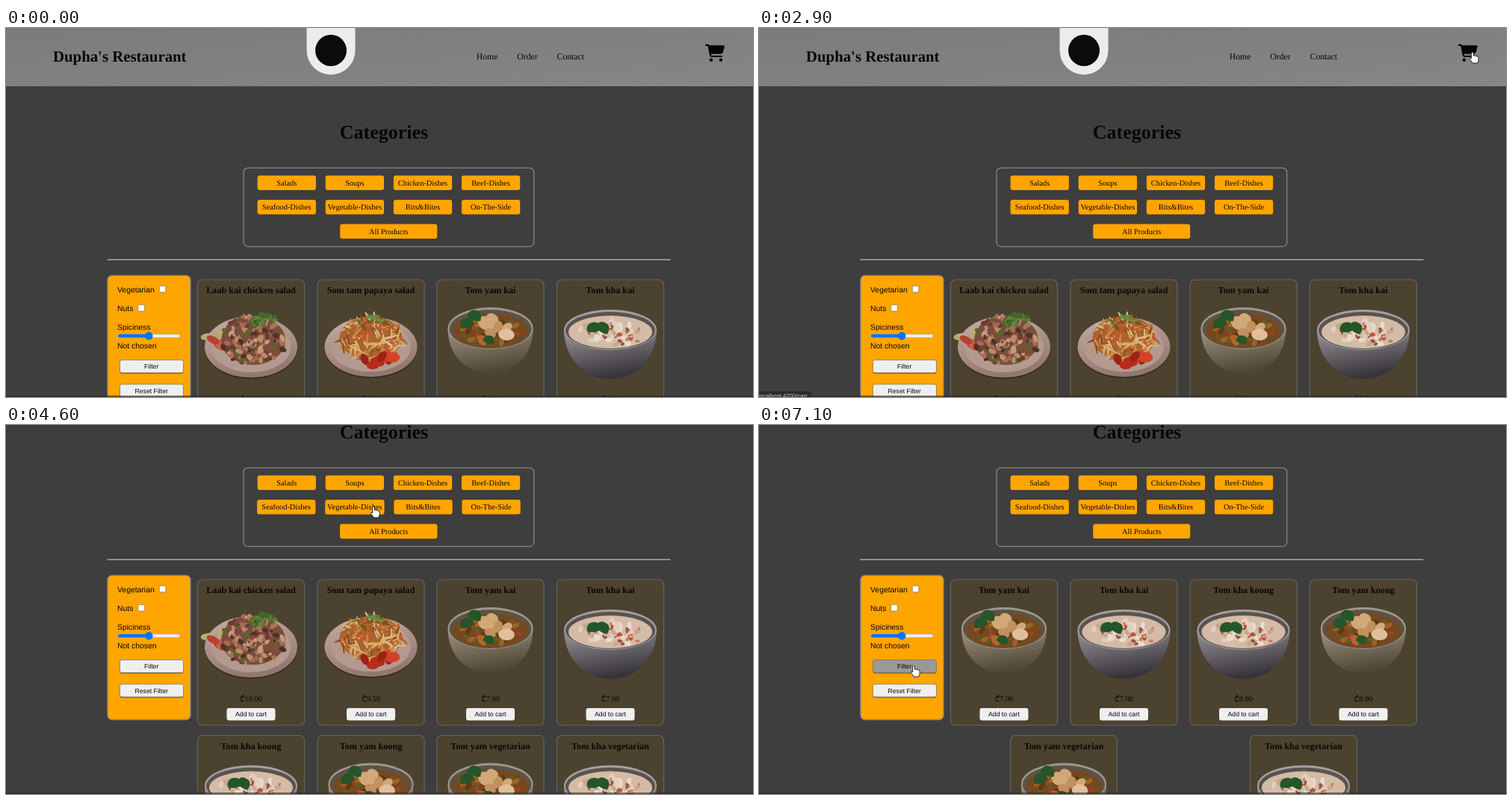
Recreate the animation shown at these times as an HTML page. Size 1000 px wide and 494 px high, loop 7.2 s.

```html
<!DOCTYPE html>
<html lang="en">
<head>
<meta charset="utf-8">
<title>Restaurant menu</title>
<style>
  html, body { margin: 0; width: 100%; height: 100%; overflow: hidden; background: #3e3e3e; }
  svg { display: block; width: 100vw; height: 100vh; }
  text { font-family: "Liberation Serif", "Times New Roman", "DejaVu Sans", serif; fill: #0b0505; text-rendering: geometricPrecision; }
  .sans { font-family: "Liberation Sans", Arial, sans-serif; }
  .bold { font-weight: bold; }
  .mid { text-anchor: middle; }
</style>
</head>
<body>
<svg id="stage" viewBox="0 0 1000 494"></svg>
<script>
const LOOP = 7200, STEP = 100;
const stage = document.getElementById('stage');
const $ = id => document.getElementById(id);

// ---------- drawing helpers ----------
const text = (s, x, y, size, cls = 'mid', extra = '') =>
  `<text class="${cls}" x="${x}" y="${y}" font-size="${size}" ${extra}>${s}</text>`;
const rect = (x, y, w, h, r, fill, extra = '') =>
  `<rect x="${x}" y="${y}" width="${w}" height="${h}" rx="${r}" fill="${fill}" ${extra}/>`;
const oval = (x, y, rx, ry, fill, extra = '') =>
  `<ellipse cx="${x}" cy="${y}" rx="${rx}" ry="${ry}" fill="${fill}" ${extra}/>`;
const path = (d, fill, extra = '') => `<path d="${d}" fill="${fill}" ${extra}/>`;

function random(seed) {
  return () => (seed = (seed * 16807) % 2147483647) / 2147483647;
}

// Scatter n small pieces inside an ellipse.
function bits(seed, n, cx, cy, rx, ry, size, flat, colors) {
  const rnd = random(seed * 7919);
  let out = '';
  for (let i = 0; i < n; i++) {
    const a = rnd() * 6.283, d = Math.sqrt(rnd()), s = size * (0.6 + rnd() * 0.7);
    const x = (cx + Math.cos(a) * d * rx).toFixed(1), y = (cy + Math.sin(a) * d * ry).toFixed(1);
    out += oval(x, y, s.toFixed(1), (s * flat).toFixed(1), colors[i % colors.length],
      `transform="rotate(${(rnd() * 180) | 0} ${x} ${y})"`);
  }
  return out;
}
// Pieces piled on a solid base.
const heap = (base, seed, n, cx, cy, rx, ry, ...rest) =>
  oval(cx, cy, rx, ry, base) + bits(seed, n, cx, cy, rx, ry, ...rest);

const plate = (y, rx, ry) =>
  oval(0, y + 2, rx, ry, '#3a2c26') + oval(0, y, rx, ry, 'url(#rim)') +
  oval(0, y, rx * 0.86, ry * 0.83, '#b39a90');
const dip = (x, y) =>
  oval(x, y + 7, 22, 13, '#15110f') + oval(x, y, 25, 13, '#24201d') +
  oval(x, y + 1, 20, 9, '#451c10') + bits(5, 9, x, y, 13, 5, 2.5, 0.6, ['#8c3c16', '#64732b', '#b0562a']);
const leaf = (x, y, r, s = 1) =>
  path('M-10 2Q-9-9 1-8Q9-8 9 4Q0 8-10 2Z', '#24562a', `transform="translate(${x} ${y}) rotate(${r}) scale(${s})"`);
const bowl = (top, rx, ry, foot, body, rim, soup) =>
  path(`M${-rx} ${top}C${-rx} ${top + 34} ${-rx * 0.62} ${foot} 0 ${foot}C${rx * 0.62} ${foot} ${rx} ${top + 34} ${rx} ${top}Z`, `url(#${body})`) +
  oval(0, top, rx, ry, rim) + oval(0, top + 1, rx - 2, ry - 2, '#5a534d') + oval(0, top + 3, rx - 6, ry - 5, soup);

const foods = {
  laab: plate(3, 62, 41) +
    bits(3, 9, -46, -11, 13, 14, 8, 0.5, ['#b8402f', '#b5ad77', '#c9614a']) +
    heap('#7c4d3b', 11, 170, 3, -6, 43, 33, 4.2, 0.65, ['#a56a50', '#bd8a6c', '#6a3d30', '#c79a7c', '#7d4a44', '#a9745a', '#57652f', '#4f3026']) +
    bits(8, 16, 18, -33, 16, 9, 4.5, 0.5, ['#41692a', '#5c8238']),
  somtam: plate(3, 62, 40) +
    heap('#a7662f', 21, 130, 0, -9, 42, 29, 10, 0.14, ['#c98a45', '#dcae6c', '#a85f2a', '#c25a2c', '#d9b98a', '#8a4a22']) +
    bits(6, 12, -2, -32, 18, 7, 6, 0.3, ['#48702f', '#6b8a42', '#b9622f']) +
    bits(13, 9, 15, 21, 26, 9, 9, 0.65, ['#b92b1b', '#d24229', '#9c2215']),
  yam: bowl(-22, 57, 28, 38, 'warm', '#a09886', '#75491f') +
    bits(9, 45, 1, -19, 41, 17, 5, 0.55, ['#9c6227', '#5d3a18', '#b1662f', '#5b6128', '#a33f20']) +
    bits(16, 7, 6, -23, 27, 13, 10, 0.72, ['#d2a878', '#c1915f', '#dfc09a']) +
    leaf(-21, -38, 15) + leaf(-31, -28, -25) + leaf(-2, -6, 10, 0.8),
  kha: bowl(-20, 62, 27, 46, 'cool', '#a39ea1', '#d3bba7') +
    bits(12, 30, 3, -16, 45, 16, 6, 0.6, ['#e2cfbe', '#c9a78f', '#e9dbcd']) +
    bits(17, 24, 7, -14, 42, 15, 2.8, 0.6, ['#bd5138', '#cb7657', '#945040']) +
    leaf(-22, -22, -15) + leaf(-10, -22, 30),
  crackers: oval(0, 16, 63, 35, '#1f1a1a') + oval(0, 13, 59, 31, '#3b3031') +
    path('M-50-4Q-35-48-12-46Q14-51 27-32Q62-18 58 10Q46 32 14 34Q-24 37-50 18Q-61 9-50-4Z', '#cda98e') +
    path('M-48-1Q-27-48 0-42Q10-23-8 1Q-29 20-48-1Z', '#e0c3ab') +
    path('M2-36Q38-37 42-8Q27 12 4 2Q-7-17 2-36Z', '#d9b89d') +
    path('M16 1Q44-15 58 4Q54 24 28 25Q9 19 16 1Z', '#e3c9b4') +
    path('M-43 11Q-14-8 12 14Q18 30-8 34Q-36 31-43 11Z', '#dbbba2'),
  cakes: plate(3, 60, 38) +
    bits(31, 14, 38, 8, 15, 18, 8, 0.2, ['#d9cca8', '#b5ac78']) +
    heap('#6b2d14', 4, 50, 3, 3, 38, 20, 9, 0.62, ['#86391a', '#a04e22', '#5e2410', '#b0602c']) + dip(-16, -35),
  satay: plate(1, 58, 40) +
    bits(22, 34, 8, -15, 38, 20, 9, 0.15, ['#dccba4', '#c9b282', '#7d8a4a']) +
    heap('#85491d', 7, 70, -1, 2, 36, 21, 7, 0.5, ['#a8652a', '#874819', '#bd7c3e', '#6d3814']),
  sauce: `<circle cx="-2" cy="-26" r="31" fill="#8a8178"/><circle cx="-2" cy="-26" r="28.5" fill="#393536"/>` +
    rect(-17, -42, 30, 30, 0, '#d8cabc') +
    path('M-36 20L-29 48Q0 59 29 48L36 20Z', '#a84a1b') + oval(0, 20, 37, 14, '#c4a596') +
    oval(0, 20, 32, 10.5, '#a0441a') + bits(18, 16, 0, 20, 24, 7, 3, 0.6, ['#c66f2a', '#bd5a24', '#7d2f12']) +
    path('M-36 24Q0 48 36 24L35 31Q0 54-35 31Z', '#c49a85', 'opacity=".75"'),
  shrimp: plate(5, 61, 40) +
    heap('#b3682f', 23, 45, -17, -4, 36, 24, 13, 0.33, ['#cc8445', '#daa36b', '#b5652a', '#e2ba8a']) + dip(36, -26),
  mini: plate(7, 60, 39) +
    heap('#8d4d1f', 25, 30, 4, 10, 37, 18, 13, 0.35, ['#b56f30', '#9b5520', '#ca8b45']) + dip(-9, -31),
  rolls: plate(5, 61, 40) +
    heap('#9d5c25', 27, 34, -9, 0, 39, 21, 14, 0.36, ['#c28039', '#d39b54', '#a66126']) + dip(21, -28)
};

// ---------- page parts ----------
function card(x, y, [name, food, price]) {
  const lines = name.split('|'), cx = x + 71.5, drop = (lines.length - 1) * 14;
  return rect(x, y, 143, 195, 6.5, '#4c4230', 'stroke="#6b635c" stroke-width="1.2"') +
    lines.map((s, i) => text(s, cx, y + 18 + i * 14, 12.19, 'bold mid')).join('') +
    `<use href="#${food}" x="${cx}" y="${y + 87 + drop}"/>` +
    text('₾' + price, cx, y + 163 + drop, 10.4) +
    rect(cx - 32.5, y + 172 + drop, 65, 16.5, 3, '#efefef') +
    text('Add to cart', cx, y + 183.3 + drop, 8.68, 'sans mid');
}

const TOP = [256.5, 417, 577, 737.5];
const menus = {
  all: { below: TOP, items: [
    ['Laab kai chicken salad', 'laab', '10.00'], ['Som tam papaya salad', 'somtam', '9.50'],
    ['Tom yam kai', 'yam', '7.00'], ['Tom kha kai', 'kha', '7.00'],
    ['Tom kha koong', 'kha', '8.00'], ['Tom yam koong', 'yam', '8.00'],
    ['Tom yam vegetarian', 'yam', '7.00'], ['Tom kha vegetarian', 'kha', '7.00']] },
  snacks: { below: [283.5, 497, 711], items: [
    ['Prawn crackers', 'crackers', '2.50'], ['Fish cakes', 'cakes', '6.50'],
    ['Chicken satay', 'satay', '6.50'], ['Satay sauce', 'sauce', '1.50'],
    ['Shrimp springrolls', 'shrimp', '6.50'], ['Mini vegetarian spring|rolls', 'mini', '5.50'],
    ['Chicken springrolls', 'rolls', '6.50']] },
  soups: { below: [336.5, 657.5], items: [
    ['Tom yam kai', 'yam', '7.00'], ['Tom kha kai', 'kha', '7.00'],
    ['Tom kha koong', 'kha', '8.00'], ['Tom yam koong', 'yam', '8.00'],
    ['Tom yam vegetarian', 'yam', '7.00'], ['Tom kha vegetarian', 'kha', '7.00']] }
};
const menu = ([id, m]) => `<g id="${id}">` + m.items.map((it, i) =>
  i < 4 ? card(TOP[i], 337, it) : card(m.below[i - 4], 545.5, it)).join('') + '</g>';

const nav = [['Home', 644], ['Order', 698], ['Contact', 755.8]]
  .map(([name, cx]) => ({ name, cx, box: [cx - 21, 27, 42, 22] }));
const cats = ['Salads', 'Soups', 'Chicken-Dishes', 'Beef-Dishes', 'Seafood-Dishes',
  'Vegetable-Dishes', 'Bits&amp;Bites', 'On-The-Side', 'All Products'].map((name, i) => {
  const last = i === 8, w = last ? 130 : 78.3;
  const x = last ? 447.2 : 336.6 + (i % 4) * 91.1, y = 197.5 + (i >> 2) * 32.5;
  return { name, row: i >> 2, cx: x + w / 2, cy: y + 9.8, box: [x, y, w, 19.6] };
});
const filterBox = [152.5, 444.5, 85, 17];

const check = (x, y) => rect(x, y, 8.5, 8.5, 1.6, '#fff', 'stroke="#767676" stroke-width=".7"');
const button = (label, y, id) =>
  rect(152.5, y + 1.3, 85, 17, 2.5, '#6b4a10', 'opacity=".75"') +
  rect(152.5, y, 85, 17, 2.5, '#efefef', `id="${id}" stroke="#77705f" stroke-width=".7"`) +
  text(label, 194.7, y + 11.6, 8.68, 'sans mid');
const wheel = x => oval(x, 42.7, 2.2, 2.2, '#050303');

const shade = (id, a, b, x = 0.3) => `<linearGradient id="${id}" x2="${x}" y2="1">` +
  `<stop stop-color="${a}"/><stop offset="1" stop-color="${b}"/></linearGradient>`;

stage.innerHTML = '<defs>' +
  shade('warm', '#a0957f', '#4f4738') + shade('cool', '#9b969c', '#37343a') +
  shade('rim', '#c8aea6', '#93786f') + shade('bar', '#7b7b7b', '#868686', 1) +
  Object.entries(foods).map(([id, art]) => `<g id="${id}">${art}</g>`).join('') + '</defs>' +
  rect(0, 0, 1000, 494, 0, '#3e3e3e') + '<g id="page">' +
  rect(0, 0, 1000, 78, 0, 'url(#bar)') +
  text("Dupha's Restaurant", 63, 45, 20.8, 'bold') +
  '<g id="badge">' + path('M402.5 0V30A32.5 32.5 0 0 0 467.5 30V0Z', '#ececef') +
  '<circle cx="435" cy="30" r="21" fill="#0b0b0b"/></g>' +
  nav.map((n, i) => `<g id="nav${i}">${text(n.name, 0, 4, 11.72)}</g>` +
    rect(n.cx - 7.5, 45.7, 15, 2, 1, '#ffc531', `id="line${i}"`)).join('') +
  path('M937 22.8H939.2Q940.4 22.8 940.6 24L942.9 36.1Q943.3 38 945.1 38H958', 'none',
    'stroke="#050303" stroke-width="2.2" stroke-linecap="round" stroke-linejoin="round"') +
  path('M941 23.2H960Q962.2 23.2 961.7 25.4L959.8 32.3Q959.1 34.7 956.7 34.7H943Z', '#050303') +
  wheel(944) + wheel(957) +
  text('Categories', 506, 147.6, 26, 'bold mid') +
  rect(318, 187.3, 388.7, 105.3, 6, 'none', 'stroke="#858585" stroke-width="1.3"') +
  cats.map((c, i) => `<g id="cat${i}">` +
    rect(-c.box[2] / 2, -9.8, c.box[2], 19.6, 3, '#ffa500') + text(c.name, 0, 3.4, 10.4) + '</g>').join('') +
  rect(135.5, 309.5, 754, 1.4, 0, '#b0b0b0') +
  rect(136, 331.3, 111, 193.2, 6, '#ffa500', 'stroke="#858585" stroke-width="1.3"') +
  text('Vegetarian', 149, 353.6, 10.4, 'sans') + check(205.3, 345.3) +
  text('Nuts', 149, 379, 10.4, 'sans') + check(176.8, 370.6) +
  text('Spiciness', 149, 404.2, 10.4, 'sans') +
  rect(150, 410, 83, 4.6, 2.3, '#efefef', 'stroke="#b2a283" stroke-width=".6"') +
  rect(150, 410, 41, 4.6, 2.3, '#0075ff') + oval(191.3, 412.2, 5.2, 5.2, '#0075ff') +
  text('Not chosen', 149, 429.3, 10.4, 'sans') +
  button('Filter', 444.5, 'filter') + button('Reset Filter', 477, 'reset') +
  Object.entries(menus).map(menu).join('') + '</g>' +
  rect(0, 492, 1000, 2, 0, '#2b2326', 'opacity=".6"') +
  '<g id="status">' + rect(-3, 486.5, 73, 10, 2, '#2b292b') +
  text('localhost:4200/cart', -1, 495, 7.8, 'sans', 'style="fill:#c4c4c4"') + '</g>' +
  '<g id="arrow">' + path('M0 0V11.2L2.6 8.9L4.4 12.8L6.3 12L4.6 8.2H8Z', '#fff', 'stroke="#111" stroke-width=".8"') + '</g>' +
  '<g id="hand">' + path('M-1.3 1Q0-1 1.4 1V5.2Q2.6 4.2 3.8 5.4Q5 4.6 6.1 6Q8.2 5.6 8.2 7.6V10.4Q8 13 6.6 15H0.2Q-1.4 12-3.8 9.4Q-4 7.4-1.3 8.8Z',
    '#fff', 'stroke="#111" stroke-width=".9" stroke-linejoin="round"') + '</g>';

// ---------- motion ----------
// time, x, y of the pointer
const track = [
  [200, 800, 510], [600, 781, 345], [700, 779, 331], [900, 777, 325], [1300, 690, 140],
  [1500, 648, 40], [1700, 650, 38], [1900, 706, 37], [2000, 714, 37], [2200, 712, 38],
  [2400, 752, 38], [2600, 762, 38], [2900, 955, 32], [3200, 957, 31], [3600, 957, 31],
  [3800, 699.5, 105], [4000, 600, 150], [4300, 540, 160], [4500, 500, 126], [4600, 492, 109],
  [4800, 558, 110], [5600, 560, 111], [5800, 480, 82], [6100, 467, 77], [6400, 466, 78],
  [6800, 215, 312], [7000, 207, 322], [7200, 207, 322]
];
function pointer(t) {
  if (t < track[0][0]) return [-50, -50];
  const i = Math.max(1, track.findIndex(k => k[0] >= t));
  const [t0, x0, y0] = track[i - 1], [t1, x1, y1] = track[i], p = (t - t0) / (t1 - t0);
  return [x0 + (x1 - x0) * p, y0 + (y1 - y0) * p];
}
function scroll(t) {
  const p = Math.min(1, Math.max(0, (t - 3950) / 350));
  return 130 * p * p * (3 - 2 * p);
}
function over([x, y, w, h], t) {
  const [px, py] = pointer(t), sy = py + scroll(t);
  return px >= x && px <= x + w && sy >= y && sy <= y + h;
}
// Hover strength: share of the last 160 ms spent over the box.
function glow(box, t) {
  let n = 0;
  for (let i = 0; i < 8; i++) n += over(box, t - i * 20);
  return n / 8;
}
const show = (id, on) => $(id).setAttribute('display', on ? 'inline' : 'none');
const place = (id, x, y, s = 1) => $(id).setAttribute('transform', `translate(${x} ${y}) scale(${s})`);
// Growing items push their neighbours aside.
const push = (g, i, same) => g.reduce((sum, k, j) => sum + (same(j) ? Math.sign(i - j) * k : 0), 0);

function draw(t) {
  const [x, y] = pointer(t), s = scroll(t);
  place('page', 0, -s);

  const ng = nav.map(n => glow(n.box, t));
  nav.forEach((n, i) => {
    place('nav' + i, n.cx + 1.2 * push(ng, i, () => true), 38, 1 + 0.09 * ng[i]);
    show('line' + i, ng[i] > 0);
    $('line' + i).setAttribute('width', 15 * ng[i]);
    $('line' + i).setAttribute('x', n.cx - 7.5 * ng[i]);
  });
  place('badge', -0.5 * Math.max(...ng), 0);

  const cg = cats.map(c => glow(c.box, t));
  cats.forEach((c, i) =>
    place('cat' + i, c.cx + push(cg, i, j => cats[j].row === c.row), c.cy, 1 + 0.025 * cg[i]));

  const onFilter = over(filterBox, t);
  $('filter').setAttribute('fill', onFilter ? '#999' : '#efefef');
  show('all', t < 4900);
  show('snacks', t >= 4900 && t < 6200);
  show('soups', t >= 6200);
  show('status', t >= 2900 && t < 3900);

  const hand = onFilter || over([935, 20, 28, 27], t) || [...nav, ...cats].some(o => over(o.box, t));
  show('hand', hand);
  show('arrow', !hand);
  place(hand ? 'hand' : 'arrow', x, y);
}

const start = performance.now();
function tick() {
  const t = (performance.now() - start) % LOOP;
  draw(Math.floor(t / STEP) * STEP);
  requestAnimationFrame(tick);
}
tick();
</script>
</body>
</html>
```
